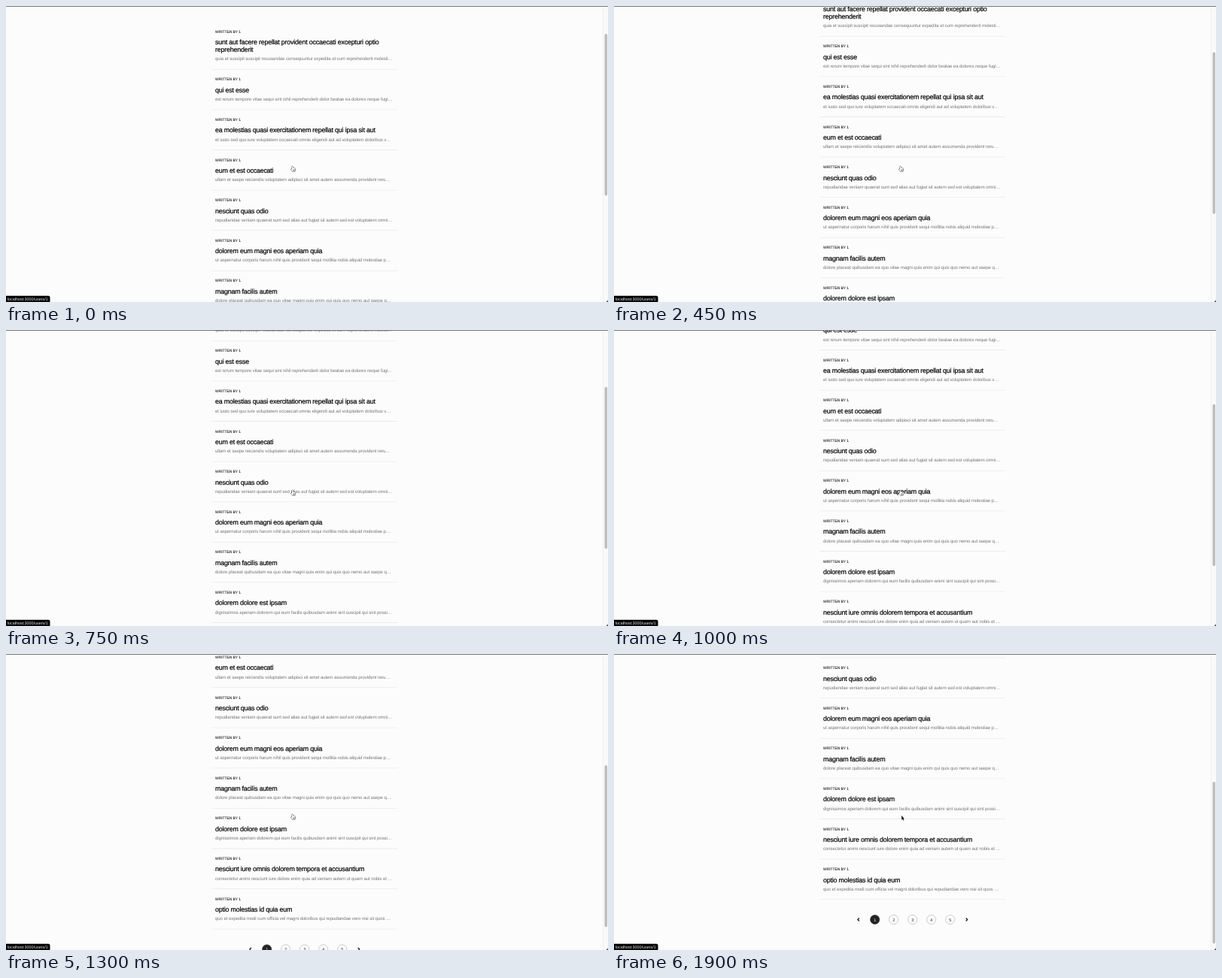
These frames come from a looping animation (800x394 px, 2000 ms). An HTML page with a canvas:

```html
<!DOCTYPE html>
<html lang="en">
<head>
<meta charset="utf-8">
<title>Scrolling post list</title>
<style>
  html, body { margin: 0; width: 100%; height: 100%; overflow: hidden; background: #fcfcfc; }
  canvas { display: block; width: 800px; height: 394px; }
</style>
</head>
<body>
<canvas id="stage"></canvas>
<script>
const W = 800, H = 394, LOOP = 2000;
const LEFT = 278, PITCH = 53.6, FIRST_EXTRA = 10;
const canvas = document.getElementById('stage');
const ctx = canvas.getContext('2d');
const ratio = window.devicePixelRatio || 1;
canvas.width = W * ratio;
canvas.height = H * ratio;

const posts = [
  ['sunt aut facere repellat provident occaecati excepturi optio\nreprehenderit',
   'quia et suscipit suscipit recusandae consequuntur expedita et cum reprehenderit molesti…'],
  ['qui est esse',
   'est rerum tempore vitae sequi sint nihil reprehenderit dolor beatae ea dolores neque fugi…'],
  ['ea molestias quasi exercitationem repellat qui ipsa sit aut',
   'et iusto sed quo iure voluptatem occaecati omnis eligendi aut ad voluptatem doloribus v…'],
  ['eum et est occaecati',
   'ullam et saepe reiciendis voluptatem adipisci sit amet autem assumenda provident reru…'],
  ['nesciunt quas odio',
   'repudiandae veniam quaerat sunt sed alias aut fugiat sit autem sed est voluptatem omni…'],
  ['dolorem eum magni eos aperiam quia',
   'ut aspernatur corporis harum nihil quis provident sequi mollitia nobis aliquid molestiae p…'],
  ['magnam facilis autem',
   'dolore placeat quibusdam ea quo vitae magni quis enim qui quis quo nemo aut saepe q…'],
  ['dolorem dolore est ipsam',
   'dignissimos aperiam dolorem qui eum facilis quibusdam animi sint suscipit qui sint possi…'],
  ['nesciunt iure omnis dolorem tempora et accusantium',
   'consectetur animi nesciunt iure dolore enim quia ad veniam autem ut quam aut nobis et …'],
  ['optio molestias id quia eum',
   'quo et expedita modi cum officia vel magni doloribus qui repudiandae vero nisi sit quos …']
];

// [time in ms, scroll offset]; the wheel moves the page in hard steps
const scrollSteps = [
  [0, 0], [50, 6], [150, 16], [350, 24], [400, 35], [450, 44],
  [650, 50], [700, 60], [750, 70], [950, 90], [1000, 111.4],
  [1200, 140], [1250, 176], [1300, 200.5],
  [1500, 207], [1550, 216.7], [1600, 231], [1650, 240]
];

function scrollAt(t) {
  let offset = 0;
  for (const [start, value] of scrollSteps) if (t >= start) offset = value;
  return offset;
}

function text(str, x, y, size, color, spacing = 0, weight = 0) {
  ctx.font = `${size}px "Liberation Sans", Arial, sans-serif`;
  ctx.letterSpacing = spacing + 'px';
  ctx.textRendering = 'geometricPrecision';
  ctx.fillStyle = color;
  ctx.fillText(str, x, y);
  if (weight) {
    ctx.strokeStyle = color;
    ctx.lineWidth = weight;
    ctx.strokeText(str, x, y);
  }
}

function box(x, y, w, h, radius, color) {
  ctx.fillStyle = color;
  ctx.beginPath();
  ctx.roundRect(x, y, w, h, radius);
  ctx.fill();
}

function shape(path, fill, stroke, width) {
  ctx.lineJoin = ctx.lineCap = 'round';
  ctx.lineWidth = width;
  ctx.fillStyle = fill;
  ctx.strokeStyle = stroke;
  ctx.stroke(path);
  ctx.fill(path);
}

function drawPost([title, excerpt], top) {
  text('WRITTEN BY 1', LEFT, top + 1.8, 5, '#222', -0.085, 0.1);
  const lines = title.split('\n');
  lines.forEach((line, i) => text(line, LEFT, top + 17.2 + i * FIRST_EXTRA, 8.9, '#000', -0.2, 0.2));
  const y = top + (lines.length - 1) * FIRST_EXTRA;
  text(excerpt, LEFT, y + 28.4, 6.12, '#777', -0.105);
  box(273, y + 40, 247, 0.8, 0, '#ebebeb');
}

function chevron(x, y, dir) {
  ctx.strokeStyle = '#111';
  ctx.lineWidth = 1.2;
  ctx.lineJoin = ctx.lineCap = 'butt';
  ctx.lineJoin = 'miter';
  ctx.beginPath();
  ctx.moveTo(x - dir, y - 2);
  ctx.lineTo(x + dir, y);
  ctx.lineTo(x - dir, y + 2);
  ctx.stroke();
}

function drawPager(y) {
  chevron(324.9, y, -1);
  chevron(468.7, y, 1);
  ctx.textAlign = 'center';
  for (let page = 1; page <= 5; page++) {
    const x = 321.7 + page * 25, active = page === 1;
    ctx.beginPath();
    ctx.arc(x, y, 6.1, 0, Math.PI * 2);
    ctx.fillStyle = active ? '#222' : '#fdfdfd';
    ctx.strokeStyle = active ? '#222' : '#aaa';
    ctx.lineWidth = 0.6;
    ctx.fill();
    ctx.stroke();
    text(page, x, y + 2, 5.5, active ? '#fff' : '#222');
  }
  ctx.textAlign = 'left';
}

const hand = new Path2D(
  'M380 217.2V213.9Q380.1 213.1 380.7 213.2Q381.2 213.3 381.2 214V215.5' +
  'Q382 215.1 382.4 215.7Q383.1 215.3 383.5 216Q384.5 215.8 384.5 216.8' +
  'V218.3L383.8 220.4H380.8L378.7 217.7Q378.4 216.9 379.1 216.8Z');
const arrow = new Path2D('M382.2 215V221L383.5 219.8L384.3 221.7L385.2 221.3L384.4 219.5H386Z');

function drawPointer(t) {
  if (t < 1850) {
    shape(hand, '#fff', '#222', 0.9);
    ctx.lineWidth = 0.4;
    ctx.stroke(new Path2D('M381.5 217.8V219.4M382.5 217.8V219.4M383.5 217.8V219.4'));
  } else {
    shape(arrow, '#111', '#fff', 0.8);
  }
}

function drawChrome(scroll) {
  box(793.5, 0, 6.5, H, 0, '#fafafa');
  box(793.3, 0, 0.6, H, 0, '#e8e8e8');
  box(795.5, 37 + scroll * 0.554, 3.6, 215.5, 1.8, '#bdbdbd');
  box(0, 0, W, 1, 0, '#777');
  box(0, 385.8, 58.5, 8.2, [0, 2, 0, 0], '#000');
  text('localhost:3000/users/1', 1.8, 391.8, 5.4, '#eee');
  ctx.fillStyle = '#333';
  ctx.fill(new Path2D('M800 390.5Q799.6 393.6 796.5 394H800Z'));
}

function draw(t) {
  const scroll = scrollAt(t);
  ctx.setTransform(ratio, 0, 0, ratio, 0, 0);
  ctx.fillStyle = '#fcfcfc';
  ctx.fillRect(0, 0, W, H);
  posts.forEach((post, i) => {
    const top = 33.9 + i * PITCH + (i ? FIRST_EXTRA : 0) - scroll;
    if (top > -60 && top < H + 10) drawPost(post, top);
  });
  drawPager(593.5 - scroll);
  drawChrome(scroll);
  drawPointer(t);
}

const begin = performance.now();
function tick() {
  draw((performance.now() - begin) % LOOP);
  requestAnimationFrame(tick);
}
tick();
</script>
</body>
</html>
```
